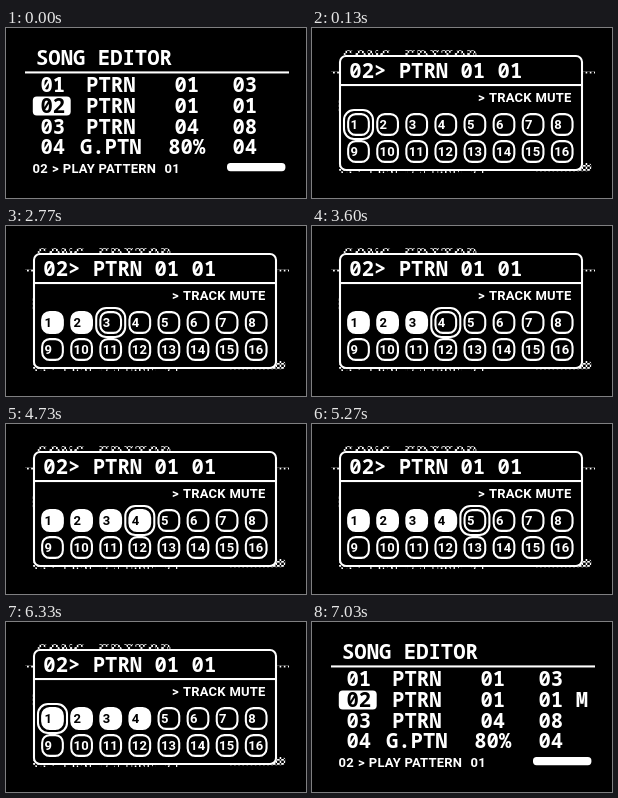
An HTML page for the animation above (8830 ms loop, 300x170 px).

```html
<!DOCTYPE html>
<html lang="en">
<head>
<meta charset="utf-8">
<title>Song editor</title>
<style>
html, body { margin: 0; width: 100%; height: 100%; overflow: hidden; background: #000; }
svg { display: block; width: 300px; height: 170px; fill: #fff; }
text { white-space: pre; }
.big { font: 600 20.6px "Noto Sans Mono", "DejaVu Sans Mono", monospace; }
.mid { text-anchor: middle; }
.small { font: 600 13px Roboto, sans-serif; letter-spacing: .2px; }
.line { fill: #000; stroke: #fff; stroke-width: 2.07; }
</style>
</head>
<body>
<svg viewBox="0 0 300 170">
  <defs>
    <pattern id="checker" x="18.6" y="43.4" width="4.14" height="4.14" patternUnits="userSpaceOnUse">
      <path d="M0 0h2.07v4.14h2.07v-2.07h-4.14z" fill="#000" shape-rendering="crispEdges"/>
    </pattern>
  </defs>
  <g id="editor"></g>
  <g id="popup"></g>
</svg>
<script>
const LOOP = 8830, OPEN = 130, CLOSE = 7030;
const PX = 2.07;
const fills = [1770, 2500, 3270, 4730];
// [time, button under the cursor]
const moves = [[0, 0], [2070, 1], [2770, 2], [3600, 3], [5270, 4], [5470, 5],
  [5830, 4], [5930, 3], [6070, 2], [6200, 1], [6330, 0]];

const editor = document.getElementById('editor');
const popup = document.getElementById('popup');

function add(parent, tag, attrs, text = '') {
  const el = document.createElementNS('http://www.w3.org/2000/svg', tag);
  for (const key in attrs) el.setAttribute(key, attrs[key]);
  el.textContent = text;
  return parent.appendChild(el);
}
const box = (parent, x, y, width, height, rx = 0, more = {}) =>
  add(parent, 'rect', { x, y, width, height, rx, ...more });
const label = (parent, x, y, text, style, fill = '#fff') =>
  add(parent, 'text', { x, y, class: style, fill }, text);
const ring = (x, y, size, rx) =>
  box(popup, x - size / 2, y - size / 2, size, size, rx, { class: 'line' });

// Song list
label(editor, 30, 37.4, 'SONG EDITOR', 'big');
box(editor, 19, 43.4, 264, PX);
box(editor, 26.8, 68.6, 37.9, 18.9, 4);
const columns = [46.8, 104.8, 180.8, 238.8];
const rows = ['01 PTRN 01 03', '02 PTRN 01 01', '03 PTRN 04 08', '04 G.PTN 80% 04'];
rows.forEach((row, r) => row.split(' ').forEach((cell, c) =>
  label(editor, columns[c], 64.1 + 20.7 * r, cell, 'big mid', r === 1 && c === 0 ? '#000' : '#fff')));
const muteMark = label(editor, 270, 84.8, 'M', 'big mid');
[[26.5, '02'], [46, '>'], [56.8, 'PLAY PATTERN'], [158.6, '01']]
  .forEach(([x, text]) => label(editor, x, 144.8, text, 'small'));
box(editor, 221, 135, 58.4, 8.2, 3.6);

// Mute dialog over the dimmed list
box(popup, 0, 0, 300, 170, 0, { fill: 'url(#checker)' });
box(popup, 28, 28, 242, 114, 6, { class: 'line' });
box(popup, 28, 56, 242, PX);
label(popup, 37.3, 49.7, '02> PTRN 01 01', 'big');
[[166, '>'], [177, 'TRACK'], [223.5, 'MUTE']]
  .forEach(([x, text]) => label(popup, x, 74, text, 'small'));

const cursor = ring(46.5, 96.5, 29, 10);
const buttons = Array.from({ length: 16 }, (_, i) => {
  const x = 46.5 + 29.1 * (i % 8), y = 96.5 + 27 * (i >> 3);
  return { shape: ring(x, y, 20.7, 7.5), digits: label(popup, x - 8, y + 4.8, i + 1, 'small') };
});

function draw(t) {
  const open = t >= OPEN && t < CLOSE;
  popup.style.display = open ? '' : 'none';
  muteMark.style.display = t >= CLOSE ? '' : 'none';
  const at = moves.filter(([start]) => t >= start).pop()[1];
  cursor.setAttribute('transform', `translate(${29.1 * at} 0)`);
  buttons.forEach(({ shape, digits }, i) => {
    const on = t >= fills[i];
    shape.style.fill = on ? '#fff' : '#000';
    digits.style.fill = on ? '#000' : '#fff';
  });
}

const start = performance.now();
function tick() {
  draw((performance.now() - start) % LOOP);
  requestAnimationFrame(tick);
}
tick();
</script>
</body>
</html>
```
